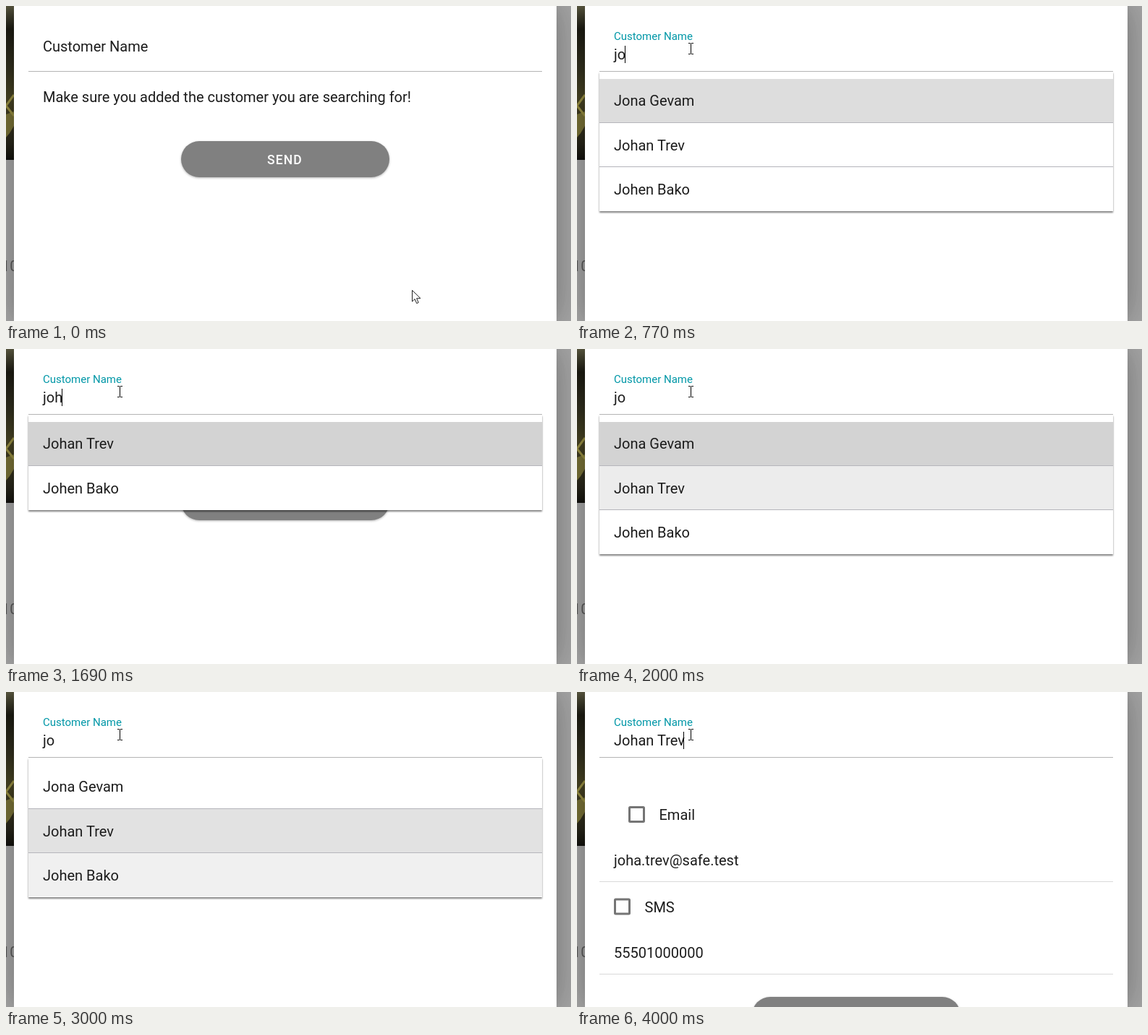
An HTML page that plays this animation: 781x436 px, repeating every 4230 ms.

```html
<!DOCTYPE html>
<html lang="en">
<head>
<meta charset="utf-8">
<title>Customer search</title>
<style>
  html, body { margin: 0; width: 100%; height: 100%; overflow: hidden; }
  #scene { position: relative; width: 100%; height: 100%; overflow: hidden; contain: strict; background: #a8a8a8; }
  .photo { position: absolute; left: 0; top: 0; width: 11px; height: 213px; }
  .price { position: absolute; left: -6px; top: 349px; font: 20px/22px Roboto, sans-serif; color: #5a5a5a; }
  .shade {
    position: absolute; left: 11px; top: 0; width: 750px; height: 100%; background: #fff;
    box-shadow: 0 0 19px -9px rgba(0,0,0,.2), 0 0 47px 4px rgba(0,0,0,.14), 0 0 57px 10px rgba(0,0,0,.12);
  }
  #dialog { position: absolute; left: 0; top: 0; width: 781px; height: 436px; overflow: hidden; }
  text { font: 20px Roboto, sans-serif; fill: #1c1c1c; white-space: pre; }
  #button rect { fill: #808080; filter: drop-shadow(0 1.5px 1.5px rgba(0,0,0,.3)); }
  #button text { font-size: 17.5px; font-weight: 500; letter-spacing: 1.1px; fill: #fff; }
  #panel { fill: #fff; filter: drop-shadow(0 2px 1.2px rgba(0,0,0,.5)); }
  .box { fill: none; stroke: #757575; stroke-width: 3; }
  .rule { fill: #d9d9d9; }
</style>
</head>
<body>
<div id="scene">
  <svg class="photo" viewBox="0 0 11 213">
    <linearGradient id="glow" x2="0" y2="1">
      <stop offset="0" stop-color="#5c5a42"/>
      <stop offset=".15" stop-color="#1d1c14"/>
      <stop offset=".4" stop-color="#33311f"/>
      <stop offset=".6" stop-color="#4a4625"/>
      <stop offset=".9" stop-color="#28261a"/>
      <stop offset="1" stop-color="#14130f"/>
    </linearGradient>
    <rect width="11" height="213" fill="url(#glow)"/>
    <path d="M0 150L11 146V166L5 176 0 182Z" fill="#7a7338"/>
    <path d="M11 123L0 138 11 152" fill="none" stroke="#9a9044" stroke-width="3"/>
  </svg>
  <div class="price">10</div>
  <div class="shade"></div>

  <svg id="dialog" viewBox="0 0 781 436">
    <text id="label" x="51">Customer Name</text>
    <text id="value" x="51" y="74"></text>
    <path id="squiggle" d="M51 78l2-2 2 2 2-2 2 2 2-2 2 2 2-2 2 2" fill="none" stroke="#e02020" stroke-width="1.2"/>
    <rect id="caret" y="55" width="1" height="24"/>
    <rect x="31" y="90" width="710" height="1" fill="#b4b4b4"/>

    <text id="hint" x="51" y="133">Make sure you added the customer you are searching for!</text>
    <g id="button">
      <rect x="242" y="187" width="288" height="50" rx="25"/>
      <text x="361" y="219">SEND</text>
    </g>

    <g id="contact">
      <rect class="box" x="72.5" y="159.5" width="20" height="20" rx="1"/>
      <text x="113.500" y="177">Email</text>
      <text x="51" y="240">joha.trev@safe.test</text>
      <rect class="rule" x="31" y="262" width="710" height="1"/>
      <rect class="box" x="52.5" y="287" width="20" height="20" rx="1"/>
      <text x="93.500" y="305">SMS</text>
      <text x="51" y="368">55501000000</text>
      <rect class="rule" x="31" y="390" width="710" height="1"/>
    </g>

    <clipPath id="listClip"><rect id="clipBox" x="31" y="91" width="710"/></clipPath>
    <g id="list">
      <rect id="panel" x="31" y="91" width="710"/>
      <rect x="31" y="90" width="710" height="1" fill="#b4b4b4"/>
      <g id="rows" clip-path="url(#listClip)"></g>
    </g>

    <path id="arrow" d="M0 .5V16l3.6-3.4 2.6 6 2.5-1.1-2.6-5.8H11.5Z" fill="#fff" stroke="#222"/>
    <path id="beam" d="M154 51.5h3M158 51.5h3M157.5 52v14M154 66.500h3M158 66.500h3" fill="none" stroke="#000"/>
  </svg>
</div>

<script>
const LOOP = 4230, ROW = 61, TOP = 101, MAX_HEIGHT = 311;
const JONA = "Jona Gevam", JOHAN = "Johan Trev", JOHEN = "Johen Bako";
const three = [JONA, JOHAN, JOHEN];
const WHITE = 255, ACTIVE = 211;
const $ = id => document.getElementById(id);

// Each step lists only what differs from the step before it.
const steps = [
  [0, { arrow: [561, 393], float: 0, value: "", caret: null, names: [], shades: [], misspelt: false, done: false }],
  [70, { arrow: [505, 338] }],
  [150, { arrow: [392, 228] }],
  [230, { arrow: [248, 116] }],
  [310, { arrow: null }],
  [390, { float: 0.6, caret: "end" }],
  [460, { float: 1, value: "j" }],
  [540, { value: "jo", names: [...three, "Jarl Vemot", "Tajra Pelin"] }],
  [690, { names: three, shades: [247] }],
  [770, { shades: [221] }],
  [1080, { caret: null }],
  [1310, { value: "joh", caret: "end" }],
  [1460, { names: [JOHAN, JOHEN], shades: [253] }],
  [1540, { shades: [228] }],
  [1690, { shades: [ACTIVE] }],
  [1850, { value: "jo", caret: null }],
  [1930, { names: three, shades: [ACTIVE, 218] }],
  [2000, { shades: [ACTIVE, 236] }],
  [2160, { shades: [ACTIVE] }],
  [2390, { caret: "end" }],
  [2620, { shades: [244, 221] }],
  [2850, { shades: [WHITE, ACTIVE] }],
  [2930, { caret: null }],
  [3000, { shades: [WHITE, 226, 240] }],
  [3160, { shades: [WHITE, 250, 216] }],
  [3230, { shades: [WHITE, WHITE, ACTIVE], caret: "start", misspelt: true }],
  [3460, { shades: [WHITE, 234, 230] }],
  [3540, { shades: [WHITE, ACTIVE] }],
  [3770, { caret: null }],
  [4000, { value: JOHAN, caret: "end", names: [], misspelt: false, done: true }]
];
let merged = {};
const states = steps.map(([at, change]) => ({ at, ...(merged = { ...merged, ...change }) }));

const show = (id, on) => { $(id).style.display = on ? "" : "none"; };

function rowMarkup(name, i, names, shade = WHITE) {
  const y = TOP + i * ROW;
  const line = i < names.length - 1
    ? `<rect x="31" y="${y + ROW - 1}" width="710" height="1" fill="#b5b5bb"/>` : "";
  return `<rect x="31" y="${y}" width="710" height="${ROW - 1}" fill="rgb(${shade},${shade},${shade})"/>
    <text x="51" y="${y + (i ? 38 : 37)}">${name}</text>${line}`;
}

function render(s) {
  const label = $("label");
  label.setAttribute("y", 63 - 16 * s.float);
  label.style.fontSize = 20 - 5 * s.float + "px";
  label.style.fill = s.float ? "#0097a7" : "";

  $("value").textContent = s.value;
  show("squiggle", s.misspelt);
  show("caret", s.caret);
  const end = s.value ? Math.floor(51 + $("value").getComputedTextLength()) - 1 : 51;
  $("caret").setAttribute("x", s.caret === "end" ? end : 51);

  show("hint", !s.done);
  show("contact", s.done);
  $("button").setAttribute("transform", `translate(0 ${s.done ? 235 : 0})`);

  const height = Math.min(10 + ROW * s.names.length, MAX_HEIGHT);
  show("list", s.names.length);
  for (const id of ["panel", "clipBox"]) $(id).setAttribute("height", height);
  $("rows").innerHTML = s.names.map((name, i) => rowMarkup(name, i, s.names, s.shades[i])).join("");

  show("arrow", s.arrow);
  show("beam", !s.arrow);
  if (s.arrow) $("arrow").setAttribute("transform", `translate(${s.arrow[0] + 0.5} ${s.arrow[1]})`);
}

let current;
function tick() {
  const t = performance.now() % LOOP;
  const state = states.findLast(s => s.at <= t);
  if (state !== current) render(current = state);
  requestAnimationFrame(tick);
}
tick();
</script>
</body>
</html>
```
